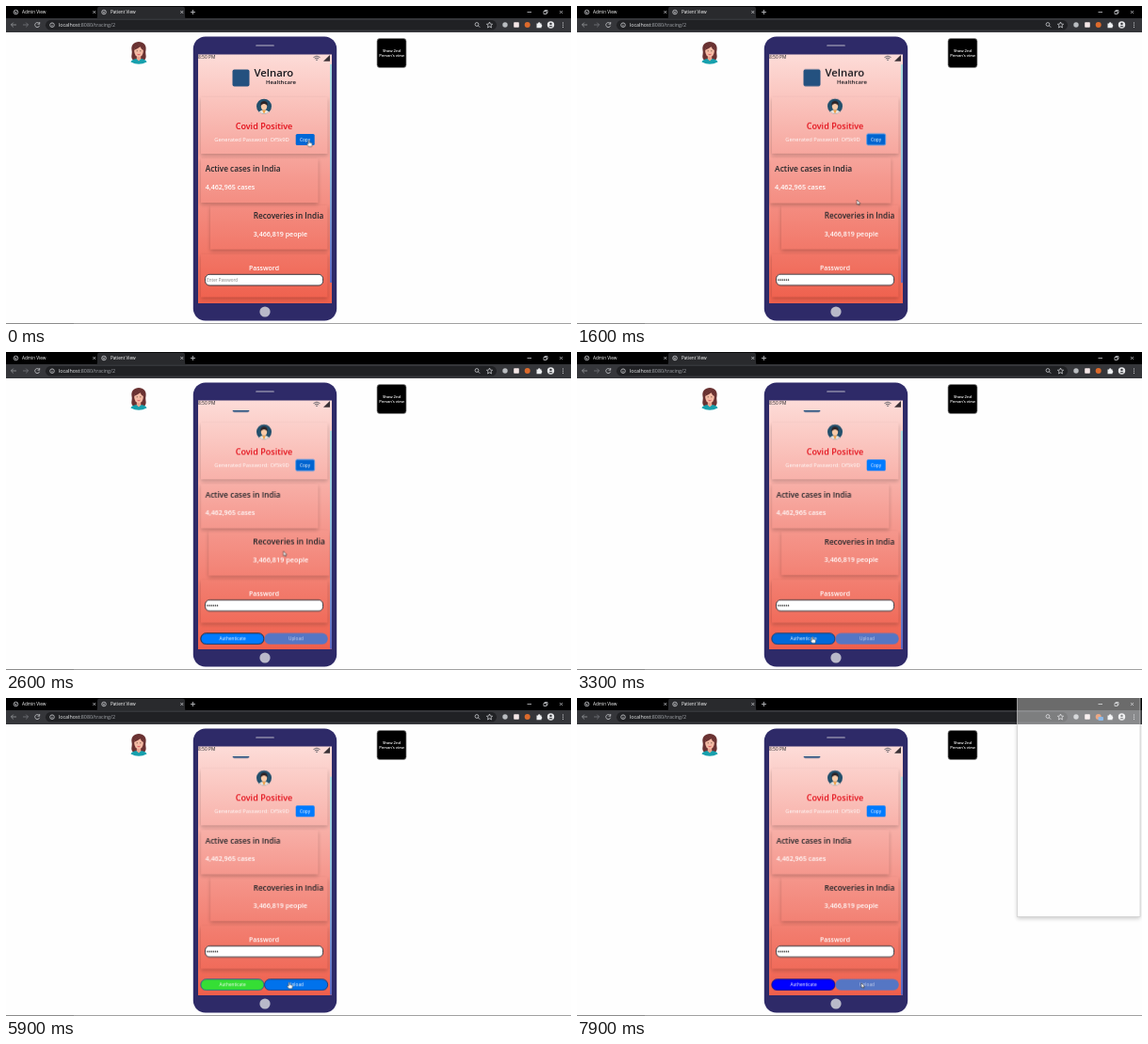
An HTML page that plays this animation: 600 px wide and 338 px high, repeating every 8 s.

```html
<!DOCTYPE html>
<html lang="en">
<head>
<meta charset="utf-8">
<title>Patient View</title>
<style>
html, body { margin: 0; width: 100%; height: 100%; overflow: hidden; background: #fff; }
svg { display: block; width: 600px; height: 338px; font-family: "Open Sans", "Noto Sans", sans-serif; }
.mid { text-anchor: middle; }
.semi { font-weight: 600; }
.light { fill: #fff; }
.dark { fill: #212529; }
.head { font-size: 8.25px; }
.count { font-size: 7.1px; }
.small { font-size: 4.75px; }
.tab { font-size: 4.65px; fill: #fff; }
.line { fill: none; stroke: #c8cacd; stroke-width: .8; }
.card { fill: #000; filter: url(#shade); }

/* every part shares one 8 s clock */
.anim { animation: 8s infinite both; }
.hard { animation-timing-function: step-end; }
.grow { transform-box: fill-box; transform-origin: center; }
#scroll { animation-name: scroll; }
#bar { animation-name: bar; }
#pointer { animation-name: move; }
#hand { animation-name: hand; }
#arrow { animation-name: arrow; }
#copy { animation-name: copy; }
#hint { animation-name: hint; }
#dots { animation-name: dots; }
#active { animation-name: active; }
#recover { animation-name: recover; }
#auth { animation-name: auth; }
#upload { animation-name: upload; }
#uploadText { animation-name: uploadText; }
#badge { animation-name: badge; }
#popup { animation-name: popup; }

@keyframes scroll {
  0%, 20% { transform: none; animation-timing-function: ease-out; }
  22.4%, 100% { transform: translateY(-21.7px); }
}
@keyframes bar {
  0%, 20% { transform: none; animation-timing-function: ease-out; }
  22.4%, 100% { transform: translateY(21.7px); }
}
@keyframes move {
  0%, 8.75% { transform: translate(321.6px, 142.6px); animation-timing-function: ease-in-out; }
  17.5%, 31.25% { transform: translate(297.3px, 206px); animation-timing-function: ease-in-out; }
  38.75%, 41.25% { transform: translate(250px, 302.6px); }
  43.75%, 65% { transform: translate(250.8px, 302.4px); animation-timing-function: ease-in-out; }
  72.5%, 86% { transform: translate(300.7px, 302.2px); }
  88%, 100% { transform: translate(302px, 302.8px); }
}
@keyframes hand {
  0% { opacity: 1; } 10.5% { opacity: 0; } 37% { opacity: 1; } 87.5%, 100% { opacity: 0; }
}
@keyframes arrow {
  0% { opacity: 0; } 10.5% { opacity: 1; } 37% { opacity: 0; } 87.5%, 100% { opacity: 1; }
}
@keyframes copy {
  0% { fill: #0067d6; stroke: transparent; }
  2.5% { fill: #0064d0; stroke: #5f9fe8; }
  38.75%, 100% { fill: #007bff; stroke: transparent; }
}
@keyframes hint { 0% { opacity: 1; } 2.5%, 100% { opacity: 0; } }
@keyframes dots { 0% { opacity: 0; } 2.5%, 100% { opacity: 1; } }
@keyframes active {
  0%, 11.5% { transform: none; }
  14%, 22.6% { transform: scale(1.03); }
  25%, 100% { transform: none; }
}
@keyframes recover {
  0%, 22.6% { transform: none; }
  25%, 34.5% { transform: scale(1.03); }
  37%, 100% { transform: none; }
}
@keyframes auth {
  0% { fill: #007bff; stroke: #1c2026; }
  37% { fill: #0069d9; stroke: #143a6b; }
  47.5% { fill: #35de35; stroke: #23569c; }
  87.5%, 100% { fill: #00f; stroke: #1a1a70; }
}
@keyframes upload {
  0% { fill: #5576c4; stroke: transparent; }
  47.5% { fill: #007bff; stroke: #1c2c48; }
  70.5% { fill: #0072ec; stroke: #1c3c70; }
  87.5%, 100% { fill: #5576c4; stroke: transparent; }
}
@keyframes uploadText {
  0% { opacity: .7; } 47.5% { opacity: 1; } 87.5%, 100% { opacity: .7; }
}
@keyframes badge { 0% { opacity: 0; } 92.5%, 100% { opacity: 1; } }
@keyframes popup { 0% { opacity: 0; } 98.7%, 100% { opacity: 1; } }
</style>
</head>
<body>
<svg viewBox="0 0 600 338">
  <defs>
    <linearGradient id="sky" x2="0" y2="1">
      <stop stop-color="#fddcd8"/>
      <stop offset=".5" stop-color="#f5998f"/>
      <stop offset="1" stop-color="#ef5f4c"/>
    </linearGradient>
    <linearGradient id="thumb" x2="0" y2="1">
      <stop stop-color="#a9dfe2"/>
      <stop offset=".4" stop-color="#8fc4dc"/>
      <stop offset="1" stop-color="#5a68c4"/>
    </linearGradient>
    <!-- outer shadow only, so the card itself stays clear -->
    <filter id="shade" x="-20%" y="-30%" width="140%" height="170%">
      <feGaussianBlur in="SourceAlpha" stdDeviation="2.1"/>
      <feOffset dy="2"/>
      <feComposite operator="out" in2="SourceAlpha"/>
      <feComponentTransfer><feFuncA type="linear" slope=".21"/></feComponentTransfer>
    </filter>
    <clipPath id="view"><rect x="204" y="62" width="142" height="254"/></clipPath>
    <clipPath id="round"><circle cx="274" cy="106.7" r="8"/></clipPath>
    <g id="globe">
      <circle r="2.3" class="line"/>
      <path d="M-1.6 -.6L0 .4L1.2 -1M-.6 1.6L.6 .6" class="line"/>
    </g>
    <path id="cross" d="M-1.4 -1.4L1.4 1.4M1.4 -1.4L-1.4 1.4" class="line"/>
  </defs>

  <rect width="600" height="338" fill="#fefefe"/>
  <rect y="337" width="600" height="1" fill="#a0a0a0"/>
  <rect y="337" width="72" height="1" fill="#8a8a8a"/>

  <!-- browser -->
  <g>
    <rect width="600" height="13.5" fill="#000"/>
    <rect y="13" width="600" height="15" fill="#35363a"/>
    <path d="M95 13.5Q97 13.5 97 11V3Q97 .8 99 .8H188Q190 .8 190 3V11Q190 13.5 192 13.5Z" fill="#292a2d"/>
    <use href="#globe" x="10.5" y="6.5"/>
    <use href="#globe" x="104" y="6.5"/>
    <text class="tab" x="17" y="8.2">Admin View</text>
    <text class="tab" x="111" y="8.2">Patient View</text>
    <use href="#cross" x="93.8" y="6.5"/>
    <use href="#cross" x="186.8" y="6.5"/>
    <path class="line" d="M196 6.5H201M198.5 4V9M553.5 6.5H558M571 5.5H574V8.5H571ZM572 5.500V4.500H575V7.500H574"/>
    <use href="#cross" x="589.5" y="6.5"/>
    <path class="line" d="M11 20H5.5M7.8 17.6L5.4 20L7.8 22.4" style="stroke:#9a9ca0"/>
    <path class="line" d="M18 20H23.5M21.2 17.6L23.6 20L21.2 22.4" style="stroke:#75777b"/>
    <path class="line" d="M35.3 18.7A2.5 2.5 0 1 0 35.6 20.8M35.7 17V19.2H33.5"/>
    <rect x="42" y="15" width="479" height="10.4" rx="5.2" fill="#202124"/>
    <circle class="line" cx="49" cy="20.2" r="2.3"/>
    <path class="line" d="M49 20V21.6M49 18.6V19.2"/>
    <text x="56" y="22.1" font-size="5.35" fill="#a5a8ad"><tspan fill="#f1f3f4">localhost</tspan>:8080/tracing/2</text>
    <circle class="line" cx="500" cy="19.5" r="1.9"/>
    <path class="line" d="M501.4 20.9L503.2 22.7"/>
    <path class="line" d="M513.5 17L514.4 19.1L516.6 19.3L514.9 20.8L515.5 23L513.5 21.8L511.5 23L512.1 20.8L510.4 19.3L512.6 19.1Z"/>
    <circle cx="530" cy="20" r="2.7" fill="#b9bcc0"/>
    <rect x="539.2" y="17.2" width="5.6" height="5.6" rx=".7" fill="#f4e6e6"/>
    <circle cx="553.7" cy="20" r="3" fill="#dc6a2c"/>
    <rect id="badge" class="anim hard" x="553.5" y="20" width="5.5" height="4" rx="1" fill="#3a87d8"/>
    <path d="M563.5 18.4H565A1.2 1.2 0 0 1 567.4 18.4H568.6V19.8A1.2 1.2 0 0 1 568.6 22V23.2H563.5Z" fill="#eceef0"/>
    <circle cx="578.5" cy="20" r="3.7" fill="#e6e7e9"/>
    <circle cx="578.5" cy="18.9" r="1.2" fill="#35363a"/>
    <path d="M576.2 22.3Q578.5 19.5 580.8 22.3Z" fill="#35363a"/>
    <path d="M591.5 17.5V23" stroke="#d5d7da" stroke-dasharray="1 1.2"/>
  </g>

  <!-- patient -->
  <g>
    <path d="M134.500 57C132 54 134.500 51 133.500 47C132.500 41.500 136 38 141 38C146 38 149.500 41.500 148.500 47C147.500 51 150 54 147.500 57Z" fill="#6a3232"/>
    <path d="M132.500 59.500Q133.500 56.500 138.500 56L141 58L143.500 56Q148.500 56.500 149.500 59.500Q141 64 132.500 59.500Z" fill="#16a0ad"/>
    <path d="M138.800 51H143.200V56.200L141 58.600L138.800 56.200Z" fill="#e8a48f"/>
    <ellipse cx="141" cy="48" rx="4.800" ry="6.200" fill="#f5bba5"/>
    <path d="M136 47Q136.500 41 142 41.500Q146 42.500 146 47Q143.500 46 142.500 43.300Q140 45.500 136 47Z" fill="#6a3232"/>
    <path d="M138.500 47.800H140M142 47.800H143.500" stroke="#432" stroke-width=".6"/>
    <path d="M139.500 51.300Q141 52.500 142.500 51.300" fill="none" stroke="#d33b4d" stroke-width=".8"/>
  </g>

  <rect x="394" y="34.5" width="31" height="31" rx="3" fill="#000" stroke="#8a8a8a" stroke-width=".7"/>
  <g class="mid light semi" font-size="4.1">
    <text x="409.5" y="49">Show 2nd</text>
    <text x="409.5" y="53.7">Person's view</text>
  </g>

  <!-- phone -->
  <rect x="198.8" y="32.4" width="152.4" height="302.1" rx="13" fill="#2e2a68"/>
  <path d="M266 42H284" stroke="#8d8aa8" stroke-width="1.7" stroke-linecap="round"/>
  <circle cx="275" cy="325" r="5.6" fill="#b9b9c9"/>
  <rect x="204" y="51.5" width="142" height="264.5" fill="url(#sky)"/>
  <text class="dark" x="204" y="56.3" font-size="4.9">8:50 PM</text>
  <g fill="none" stroke="#444a52" stroke-width=".8">
    <path d="M326.5 54.6Q330 51.6 333.5 54.6M327.8 56Q330 54.2 332.2 56"/>
    <circle cx="330" cy="57.2" r=".4"/>
  </g>
  <path d="M337 58.8L344 52V58.8Z" fill="#3a3136"/>

  <g clip-path="url(#view)">
    <g id="scroll" class="anim">
      <rect x="240.5" y="67.5" width="18" height="18" rx="2" fill="#24517f"/>
      <g class="semi" fill="#16161c">
        <text x="263.5" y="75.3" font-size="11.3">Velnaro</text>
        <text x="276" y="83.3" font-size="6.05">Healthcare</text>
      </g>

      <rect class="card" x="207" y="97" width="134.5" height="60"/>
      <g clip-path="url(#round)">
        <rect x="266" y="98" width="16" height="18" fill="#23506c"/>
        <path d="M267.5 116Q268 110.8 274 110.6Q280 110.8 280.5 116Z" fill="#e9e4de"/>
        <path d="M272 110.5H276L274 115Z" fill="#f0a048"/>
        <ellipse cx="274" cy="106.500" rx="3.200" ry="4" fill="#f8cba8"/>
        <path d="M270.5 106.5Q269.500 101.300 274 101.100Q278.500 101.300 277.500 106.500Q276.500 103.800 274 104Q271.500 103.800 270.500 106.500Z" fill="#2d2426"/>
      </g>
      <text class="mid semi" x="274" y="131.4" font-size="9.05" fill="#e30d18">Covid Positive</text>
      <text class="mid light" x="261" y="143.6" font-size="5.8">Generated Password: Of5k9D</text>
      <rect id="copy" class="anim hard" x="307.7" y="136" width="20" height="12" rx="1.6" stroke-width=".9"/>
      <text class="mid light small" x="317.5" y="143.6">Copy</text>

      <g id="active" class="anim grow">
        <rect class="card" x="207" y="162" width="124.5" height="47"/>
        <text class="dark semi head" x="211.7" y="176.2">Active cases in India</text>
        <text class="light semi count" x="211.7" y="195">4,462,965 cases</text>
      </g>
      <g id="recover" class="anim grow">
        <rect class="card" x="217" y="212" width="124.5" height="46.7"/>
        <text class="dark semi head" x="262.7" y="226">Recoveries in India</text>
        <text class="light semi count" x="262.7" y="244.7">3,466,819 people</text>
      </g>

      <rect class="card" x="207" y="264" width="134.5" height="45.5"/>
      <text class="mid light semi" x="274" y="281" font-size="6.9">Password</text>
      <rect x="211.6" y="285.3" width="125" height="11.7" rx="4.5" fill="#fff" stroke="#3a3a40"/>
      <text id="hint" class="anim hard" x="213.3" y="292.9" font-size="4.5" fill="#7d7d7d">Enter Password</text>
      <path id="dots" class="anim hard" d="M214 291.3H225" stroke="#111" stroke-width="1.6" stroke-linecap="round" stroke-dasharray="0 2.1"/>

      <rect id="auth" class="anim hard" x="206.8" y="320.6" width="67.2" height="11.8" rx="5.9" stroke-width=".9"/>
      <rect id="upload" class="anim hard" x="274.5" y="320.6" width="67.2" height="11.8" rx="5.9" stroke-width=".9"/>
      <text class="mid light small" x="240.5" y="328.2">Authenticate</text>
      <text id="uploadText" class="anim hard mid light small" x="308" y="328.2">Upload</text>
    </g>
    <rect id="bar" class="anim" x="344" y="62" width="2" height="232" fill="url(#thumb)"/>
  </g>

  <!-- wallet window fading in -->
  <g id="popup" class="anim hard">
    <rect class="card" x="467.5" y="-6" width="130.5" height="238.5"/>
    <rect x="467.5" y="-1" width="130.5" height="233.5" fill="#fff" fill-opacity=".42" stroke="#c9c9c9" stroke-width=".7"/>
  </g>

  <g id="pointer" class="anim" stroke="#222" stroke-width=".5" fill="#fff" stroke-linejoin="round">
    <path id="hand" class="anim hard" d="M-.7 .6Q0 -.5 .7 .6V2.6L3 3.1Q3.7 3.4 3.6 4.3L3.1 6.8H-.3L-2.2 4.3Q-2.2 3.3 -.7 4Z"/>
    <path id="arrow" class="anim hard" d="M0 0V5.2L1.2 4.2L2 6L2.8 5.6L2 3.9H3.6Z"/>
  </g>
</svg>
</body>
</html>
```
